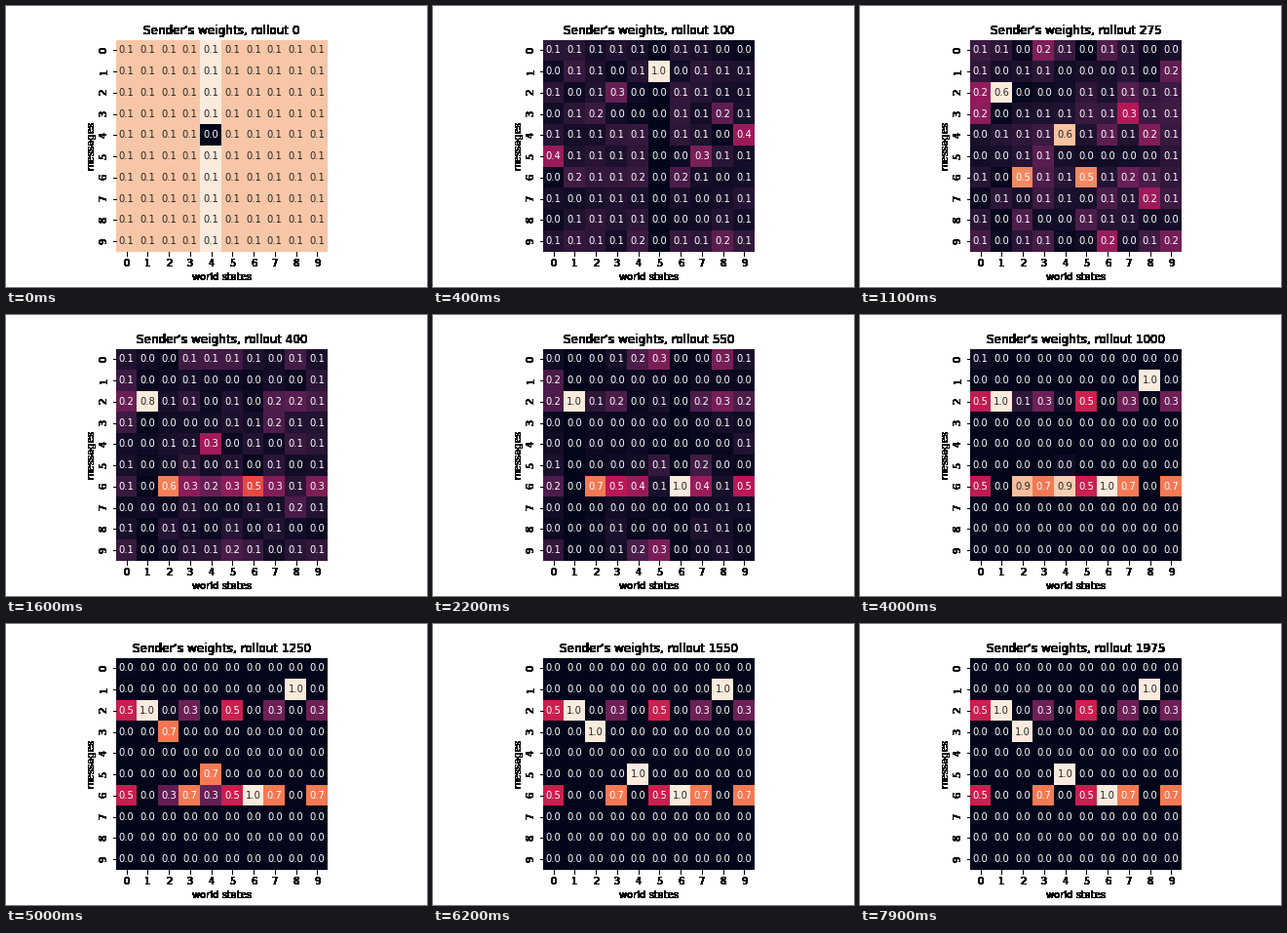
Write a matplotlib script that moves like this. It is 432 by 288 pixels and loops after 8000 ms.

```python
import numpy as np
import matplotlib.pyplot as plt
from matplotlib.animation import FuncAnimation
from matplotlib.colors import LinearSegmentedColormap

N = 10
FRAMES = 80
STEP = 25  # rollouts per frame

ROCKET = LinearSegmentedColormap.from_list("rocket", [
    "#03051a", "#221331", "#451c47", "#6a1f56", "#921c5b", "#b91657",
    "#d92847", "#ed513e", "#f47c56", "#f6a47b", "#f7c9aa", "#faebdd"])

rng = np.random.default_rng(7)


def place(peaks):
    """Weights from {message: {state: weight}}."""
    w = np.zeros((N, N))
    for message, row in peaks.items():
        for state, value in row.items():
            w[message, state] = value
    return w


def explore(peaks):
    """Strong cells, with the rest of each column shared out at random."""
    w = place(peaks)
    noise = rng.gamma(2.5, size=w.shape) * (w == 0)
    return w + noise / noise.sum(axis=0) * (1 - w.sum(axis=0))


def settle(peaks, split):
    """Messages 2 and 6 divide what the peaks leave of each state."""
    w = place(peaks)
    rest = 1 - w.sum(axis=0)
    for state, share in split.items():
        w[2, state] = share * rest[state]
        w[6, state] = (1 - share) * rest[state]
    return w


start = np.full((N, N), 1 / N)
start[:, 4] = 1 / (N - 1)
start[4, 4] = 0

split = {0: .5, 1: 1, 3: .28, 5: .5, 6: 0, 7: .28, 9: .28}

# Frame at which each state of the weights is reached.
KEYS = {
    0: start,
    4: explore({1: {5: 1}, 4: {9: .39}, 5: {7: .31}}),
    11: explore({0: {3: .2}, 2: {0: .23, 1: .62}, 3: {0: .22, 7: .28},
                 4: {4: .555}, 6: {2: .47, 5: .47}}),
    22: explore({0: {4: .2, 5: .31, 8: .3},
                 2: {0: .2, 1: 1, 2: .12, 3: .2, 7: .2, 8: .3, 9: .2},
                 5: {7: .17},
                 6: {0: .2, 2: .72, 3: .46, 4: .38, 6: 1, 7: .38, 9: .46},
                 9: {4: .2, 5: .31}}),
    40: settle({0: {0: .05}, 1: {8: 1}, 5: {4: .04}},
               split | {2: .12, 4: .04}),
    54: settle({1: {8: 1}, 3: {2: 1}, 5: {4: 1}}, split),
}
TIMES, STATES = list(KEYS), list(KEYS.values())


def weights(i):
    pos = np.interp(i, TIMES, range(len(TIMES)))
    k = min(int(pos), len(STATES) - 2)
    return STATES[k] + (pos - k) * (STATES[k + 1] - STATES[k])


def luminance(rgb):
    lin = np.where(rgb <= .03928, rgb / 12.92, ((rgb + .055) / 1.055) ** 2.4)
    return lin @ [.2126, .7152, .0722]


def harden(img, dpi):
    """Turn every touched pixel solid black, without smooth edges."""
    out = np.zeros_like(img)
    out[..., 3] = img[..., 3] > 0
    return out, 0, 0


fig = plt.figure(figsize=(6, 4), dpi=72, facecolor="white")
fig.subplots_adjust(left=.125, right=.9, bottom=.125, top=.88)
ax = fig.add_subplot(aspect="equal")

# Half a pixel back, so inner borders round down to whole pixels.
edges = np.arange(N + 1.0)
edges[1:-1] -= .5 * N / (.755 * 288)
mesh = ax.pcolormesh(edges, edges, start, cmap=ROCKET)
ax.set(xlim=(0, N), ylim=(N, 0))
ax.spines[:].set_visible(False)

centers = np.arange(N) + .5
ax.set_xticks(centers, range(N))
ax.set_yticks(centers, range(N), rotation="vertical")
ax.set_xlabel("world states", fontsize=10)
ax.set_ylabel("messages", fontsize=10)
title = ax.set_title("", fontsize=12)

solid = [title, ax.xaxis.label, ax.yaxis.label]
for axis in (ax.xaxis, ax.yaxis):
    for tick in axis.get_major_ticks():
        solid += [tick.tick1line, tick.label1]
for artist in solid:
    artist.set_agg_filter(harden)

labels = [ax.text(x, y, "", ha="center", va="center", fontsize=10)
          for y in centers for x in centers]


def update(i):
    w = np.clip(weights(i), 0, 1)
    mesh.set_array(w)
    mesh.set_clim(w.min(), w.max())
    light = luminance(mesh.to_rgba(w.ravel())[:, :3])
    for label, value, lum in zip(labels, w.ravel(), light):
        label.set_text(f"{value:.1f}")
        label.set_color(".15" if lum > .408 else "w")
    title.set_text(f"Sender's weights, rollout {i * STEP}")
    return [mesh, title, *labels]


anim = FuncAnimation(fig, update, frames=FRAMES, interval=100,
                     repeat=True, repeat_delay=0, blit=False)
plt.show()
```
